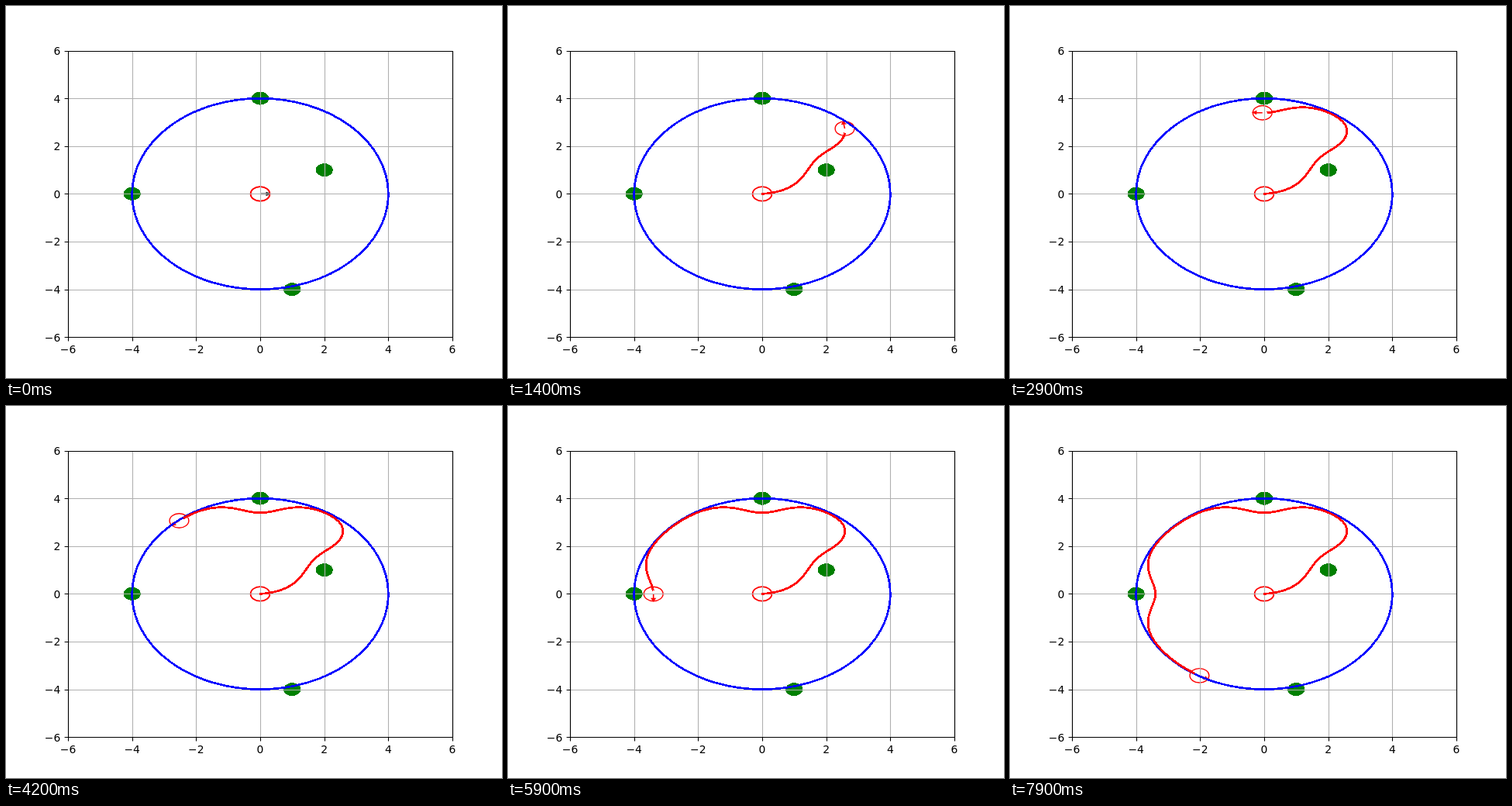
These frames come from a looping animation (640x480 px, 8000 ms). An HTML page:

```html
<!DOCTYPE html>
<html>
<head>
<meta charset="utf-8">
<style>
html, body { margin: 0; width: 100%; height: 100%; overflow: hidden; background: #fff; }
svg { display: block; width: 640px; height: 480px; }
text { font: 13.89px "DejaVu Sans", sans-serif; }
.ring { fill: none; stroke: red; stroke-width: 1.39; }
.crisp { shape-rendering: crispEdges; }
</style>
</head>
<body>
<svg viewBox="0 0 640 480">
  <g id="dots" class="crisp" fill="green" stroke="green" stroke-width="1.6"></g>
  <ellipse class="ring" cx="328" cy="242.4" rx="12.4" ry="9.24" style="stroke-width:1.8"/>
  <ellipse class="ring" id="robot" rx="12.4" ry="9.24"/>
  <path id="arrow" stroke-width="1.6"/>
  <path id="grid" stroke="#b0b0b0" stroke-width="1.11"/>
  <ellipse class="crisp" cx="328" cy="242.4" rx="165.33" ry="123.2" fill="none" stroke="blue" stroke-width="2.7"/>
  <path id="trail" class="crisp" fill="none" stroke="red" stroke-width="2.8" stroke-linejoin="round" stroke-linecap="square"/>
  <path id="axes" fill="none" stroke="#000" stroke-width="1.11"/>
  <g id="labels"></g>
</svg>
<script>
const UX = 496 / 12, UY = 369.6 / 12, STEPS = 80;
const el = id => document.getElementById(id);
const px = x => 328 + x * UX;
const py = y => 242.4 - y * UY;
const snap = v => Math.floor(v + 0.5) + 0.5;

// Static plot
el('dots').innerHTML = [[0, 4], [2, 1], [-4, 0], [1, -4]].map(([x, y]) =>
  `<ellipse cx="${px(x)}" cy="${py(y)}" rx="10.33" ry="7.7"/>`).join('');

const L = snap(80), R = snap(576), T = snap(57.6), B = snap(427.2);
let grid = '', axes = `M${L} ${T}H${R}V${B}H${L}Z`, labels = '';
for (let v = -6; v <= 6; v += 2) {
  const x = snap(px(v)), y = snap(py(v)), name = String(v).replace('-', '\u2212');
  grid += `M${x} ${T}V${B}M${L} ${y}H${R}`;
  axes += `M${x} ${B}v4.9M${L} ${y}h-4.9`;
  labels += `<text x="${px(v)}" y="448" text-anchor="middle">${name}</text>` +
    `<text x="70.3" y="${Math.round(py(v) + 5.3)}" text-anchor="end">${name}</text>`;
}
el('grid').setAttribute('d', grid);
el('axes').setAttribute('d', axes);
el('labels').innerHTML = labels;

const bump = (v, center, width) => Math.exp(-(((v - center) / width) ** 2));

// Spiral out to the orbit at a steady turn rate, swerving around each obstacle
function at(t) {
  const deg = 4.8 + 2.97 * t + 13.2 * bump(t, 7.1, 3.6);
  const orbit = 3.975, free = 0.285 * t;
  const r = free / (1 + (free / orbit) ** 12) ** (1 / 12)
    - 0.58 * (bump(deg, 90, 16) + bump(deg, 180, 16));
  const a = deg * Math.PI / 180;
  return [r * Math.cos(a), r * Math.sin(a)];
}

function draw(step) {
  const [x, y] = at(step), [x0, y0] = at(step - 0.1), [x1, y1] = at(step + 0.1);
  const angle = step ? Math.atan2(y1 - y0, x1 - x0) : 0;
  const c = Math.cos(angle), s = Math.sin(angle);
  const point = (f, w) => `${px(x + f * c - w * s)} ${py(y + f * s + w * c)}`;

  el('robot').setAttribute('cx', px(x));
  el('robot').setAttribute('cy', py(y));
  const arrow = el('arrow'), color = step ? 'red' : '#333';
  arrow.setAttribute('d', `M${point(0, 0)}L${point(0.2, 0)}` +
    `M${point(0.2, 0.05)}L${point(0.29, 0)}L${point(0.2, -0.05)}Z`);
  arrow.setAttribute('fill', color);
  arrow.setAttribute('stroke', color);

  let trail = '';
  for (let t = 0; t <= step - 1; t += 0.5) {
    const [u, v] = at(t);
    trail += `${t ? 'L' : 'M'}${px(u)} ${py(v)}`;
  }
  el('trail').setAttribute('d', trail);
}

function tick() {
  draw(Math.floor(performance.now() / 100) % STEPS);
  requestAnimationFrame(tick);
}
tick();
</script>
</body>
</html>
```
